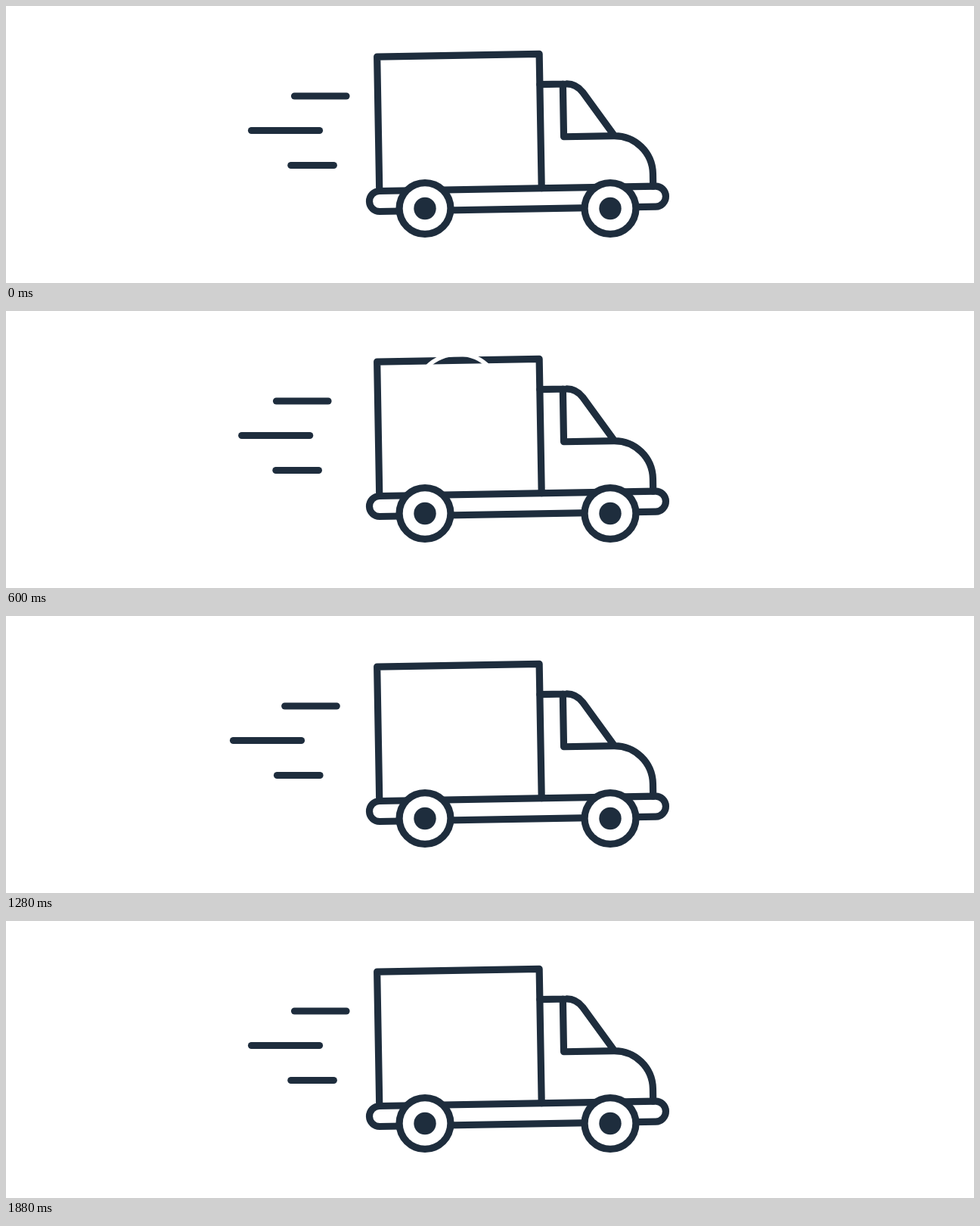
An HTML page with a canvas for the animation above (1.92 s loop, 1280x366 px).

```html
<!DOCTYPE html>
<html lang="en">
<head>
<meta charset="utf-8">
<title>Delivery van</title>
<style>
  html, body { margin: 0; width: 100%; height: 100%; overflow: hidden; background: #fff; }
  canvas { display: block; width: 100vw; height: 100vh; }
</style>
</head>
<body>
<canvas id="stage" width="1280" height="366"></canvas>
<script>
const ctx = document.getElementById('stage').getContext('2d');
const INK = '#1e2d3d', PAPER = '#fff';
const STEP = 40, LOOP = 1920, CYCLE = 960;

// Linear interpolation through [time, value] keys
function track(keys, t) {
  if (t <= keys[0][0]) return keys[0][1];
  for (let i = 1; i < keys.length; i++) {
    const [t0, v0] = keys[i - 1], [t1, v1] = keys[i];
    if (t <= t1) return v0 + (v1 - v0) * (t - t0) / (t1 - t0);
  }
  return keys[keys.length - 1][1];
}

const bodyX = [[0, 0], [320, 0], [480, -3.7], [600, 0], [760, 3.7], [920, 0]];
const bodyY = [[0, 0], [160, -4], [320, 0], [480, -3.1], [600, 0], [760, -3.6], [920, 0]];

// Each speed line slides back until its turn time, then returns
const speedLines = [
  { x: 381.5, y: 119, len: 68.5, back: 28.8, turn: 720 },
  { x: 324.5, y: 164.5, len: 90, back: 27.2, turn: 240 },
  { x: 376.8, y: 210.5, len: 56.5, back: 27.4, turn: 480 }
];

const chassis = new Path2D('M0 -13.5 H365 A13.5 13.5 0 0 1 365 13.5 H0 A13.5 13.5 0 0 1 0 -13.5 Z');
const cargo = new Path2D('M0 -13.5 V-191 H214.5 V-13.5');
const cab = new Path2D('M214.5 -150.7 H249 Q262 -151 271 -139.5 L312 -81' +
  'M245 -150.7 V-81 H311 A51 51 0 0 1 362 -30 V-13.5');

const ribbon = new Path2D('M812 163 C790 176 735 197 680 210 C640 222 610 236 585 226' +
  'C555 212 538 170 538 117 C538 84 565 57 598 57 C631 57 658 84 655 122');
const ribbonHead = [[175, 0], [280, 141], [600, 554]];
const ribbonTail = [[280, 0], [600, 225], [760, 554]];

function drawSpeedLines(t) {
  for (const { x, y, len, back, turn } of speedLines) {
    const left = x - track([[0, 0], [turn, back], [920, 0]], t);
    ctx.beginPath();
    ctx.moveTo(left, y);
    ctx.lineTo(left + len, y);
    ctx.stroke();
  }
}

function drawBody(t) {
  ctx.save();
  ctx.translate(494 + track(bodyX, t), 258 + track(bodyY, t));
  ctx.rotate(-Math.PI / 180);
  for (const part of [cargo, cab, chassis]) ctx.stroke(part);
  ctx.restore();
}

function drawRibbon(t) {
  const tail = track(ribbonTail, t), length = track(ribbonHead, t) - tail;
  if (length <= 0) return;
  ctx.save();
  ctx.strokeStyle = PAPER;
  ctx.lineWidth = 5.5;
  ctx.lineCap = 'butt';
  ctx.setLineDash([length, 2000]);
  ctx.lineDashOffset = -tail;
  ctx.stroke(ribbon);
  ctx.restore();
}

function disc(x, y, r, color) {
  ctx.beginPath();
  ctx.arc(x, y, r, 0, 2 * Math.PI);
  ctx.fillStyle = color;
  ctx.fill();
}

function drawWheel(x, y) {
  disc(x, y, 38.6, INK);
  disc(x, y, 29.3, PAPER);
  disc(x, y, 14.7, INK);
}

function draw(now) {
  const time = Math.floor((now % LOOP) / STEP) * STEP;
  const t = time % CYCLE;
  ctx.fillStyle = PAPER;
  ctx.fillRect(0, 0, 1280, 366);
  ctx.strokeStyle = INK;
  ctx.lineWidth = 9.2;
  ctx.lineCap = ctx.lineJoin = 'round';
  drawSpeedLines(t);
  drawBody(t);
  drawRibbon(time);
  drawWheel(554, 267.5);
  drawWheel(799, 267.5);
}

const start = performance.now();
function tick() {
  draw(performance.now() - start);
  requestAnimationFrame(tick);
}
tick();
</script>
</body>
</html>
```
